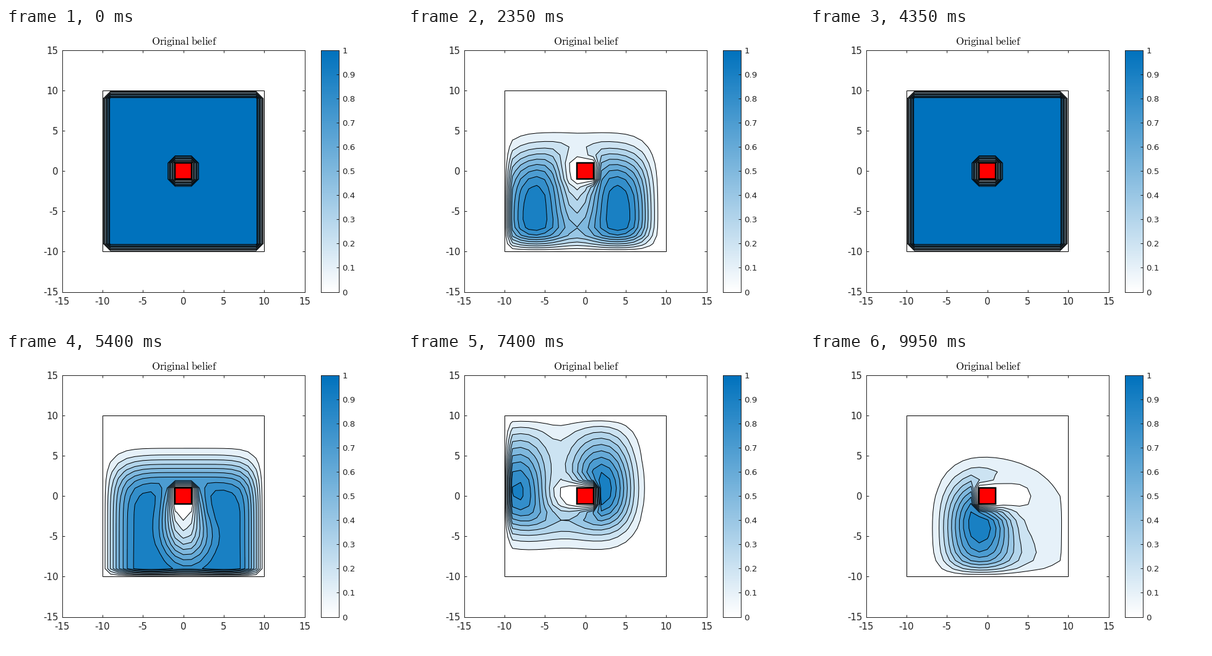
Write a matplotlib script that moves like this. It is 640x480 px and loops after 10 s.

```python
import numpy as np
import matplotlib.pyplot as plt
from matplotlib.animation import FuncAnimation
from matplotlib.colors import LinearSegmentedColormap
from matplotlib.patches import Rectangle

W, H, DPI = 640, 480, 100
PX = 72 / DPI
FRAMES, INTERVAL = 200, 50
INK = (0.13, 0.13, 0.13)

# Grid world: open room with absorbing walls and a square obstacle
xs = np.arange(-10, 11)
X, Y = np.meshgrid(xs, xs)
room = np.maximum(abs(X), abs(Y))
FREE = ((room < 10) & (room > 1)).astype(float)

FORWARD, SIDE = 0.36, 0.11
MOVES = {"L": (0, -1), "R": (0, 1), "U": (1, 0), "D": (-1, 0)}
# "." holds the uniform belief, letters push it one step per tick
PLAN = [(".", 18), ("D", 25), ("U", 2), ("L", 28),
        (".", 17), ("D", 3), ("R", 2), ("D", 25), ("R", 2), ("U", 17),
        ("L", 25), ("U", 2), ("D", 12), ("R", 1), ("D", 10), ("R", 11)]


def push(u, move):
    dy, dx = MOVES[move]

    def roll(a, b):
        return np.roll(u, (a, b), axis=(0, 1))

    out = (1 - FORWARD - 2 * SIDE) * u + FORWARD * roll(dy, dx)
    out += SIDE * (roll(dx, dy) + roll(-dx, -dy))
    return out * FREE


def simulate():
    u, states = FREE, []
    for move, count in PLAN:
        for _ in range(count):
            u = FREE if move == "." else push(u, move)
            states.append(u / u.max())
    return states


states = simulate()

cmap = LinearSegmentedColormap.from_list("belief", ["white", "#0072bd"])
lines = np.arange(1, 10) / 10
fills = [*lines, 1 - 1e-9, 1.1]
shades = [cmap(v / 10) for v in range(1, 11)]

plt.rcParams.update({"font.family": "DejaVu Sans", "mathtext.fontset": "cm",
                     "axes.linewidth": PX, "axes.edgecolor": INK,
                     "xtick.color": INK, "ytick.color": INK})
fig = plt.figure(figsize=(W / DPI, H / DPI), dpi=DPI, facecolor="white")


def box(x0, y0, x1, y1):
    return fig.add_axes([x0 / W, 1 - y1 / H, (x1 - x0) / W, (y1 - y0) / H])


ax = box(90.5, 36, 482.5, 426.5)
ax.set(xlim=(-15, 15), ylim=(-15, 15))
ticks = range(-15, 16, 5)
names = [str(t) for t in ticks]
ax.set_xticks(ticks, names)
ax.set_yticks(ticks, names)
ax.tick_params(direction="in", length=4 * PX, width=PX, labelsize=15 * PX,
               top=True, right=True)
ax.tick_params(axis="x", pad=8.5 * PX)
ax.tick_params(axis="y", pad=6 * PX)
fig.text(288 / W, 1 - 27 / H, r"$\mathrm{Original\ belief}$", color="black",
         size=16.8 * PX, ha="center", va="baseline")

bar = box(508.5, 36, 537.5, 426.5)
bar.imshow(np.linspace(0, 1, 256)[:, None], cmap=cmap, origin="lower",
           extent=(0, 1, 0, 1), aspect="auto")
bar.set_xticks([])
bar.set_yticks(np.arange(11) / 10, [f"{v / 10:g}" for v in range(11)])
bar.yaxis.tick_right()
bar.tick_params(direction="in", length=4 * PX, width=PX,
                labelsize=13.4 * PX, pad=6 * PX)

ax.add_patch(Rectangle((-10, -10), 20, 20, fill=False, ec="black", lw=PX, zorder=3))
ax.add_patch(Rectangle((-1, -1), 2, 2, fc="red", ec="black", lw=2.5 * PX, zorder=4))

drawn = []


def update(i):
    while drawn:
        drawn.pop().remove()
    u = states[i]
    drawn.append(ax.contourf(X, Y, u, levels=fills, colors=shades, zorder=1))
    drawn.append(ax.contour(X, Y, u, levels=lines, colors="black",
                            linewidths=PX, zorder=2))
    return drawn


anim = FuncAnimation(fig, update, frames=FRAMES, interval=INTERVAL,
                     repeat=True, repeat_delay=0, blit=False)
plt.show()
```
